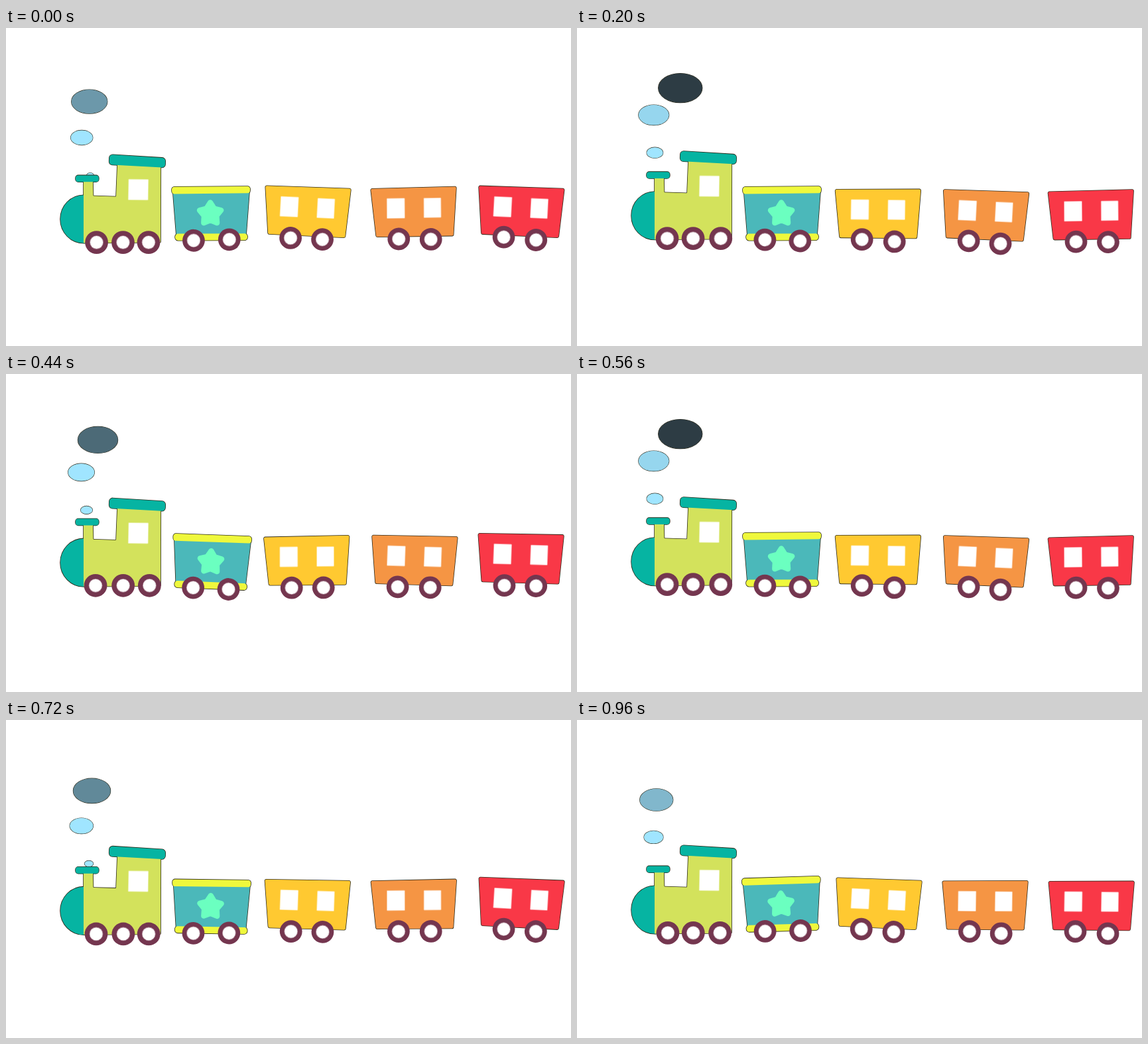
Write an HTML page with a canvas that moves like this. It is 852 by 480 pixels and loops after 1000 ms.

```html
<!DOCTYPE html>
<html lang="en">
<head>
<meta charset="utf-8">
<title>Toy train</title>
<style>
html, body { margin: 0; width: 100%; height: 100%; overflow: hidden; background: #fff; }
canvas { display: block; }
</style>
</head>
<body>
<canvas id="stage" width="852" height="480"></canvas>
<script>
const ctx = document.getElementById('stage').getContext('2d');
const CYCLE = 10;     // drawing steps per bounce
const PUFF_LIFE = 26; // steps a smoke puff stays visible
const TEAL = '#06b4a2', LIME = '#d3e25c', LEMON = '#eff83c', PLUM = '#74364f', INK = '#2c2a1a';

// Plain cars share one shape; each sways about a point near one end
const CARS = [
  { x: 389.6, fill: '#ffc931', pivot: 153 },
  { x: 551.2, fill: '#f59544', pivot: -16 },
  { x: 711.4, fill: '#f93847', pivot: 150 }
];

const wave = (n, peak, amp) => amp * Math.cos((n - peak) * 2 * Math.PI / CYCLE);
const mix = (a, b, f) => a + (b - a) * f;

// Polygon with rounded corners
function shape(points, r) {
  const path = new Path2D();
  const [ax, ay] = points[0], [bx, by] = points[points.length - 1];
  path.moveTo((ax + bx) / 2, (ay + by) / 2);
  points.forEach(([x, y], i) => path.arcTo(x, y, ...points[(i + 1) % points.length], r));
  path.closePath();
  return path;
}

function oval(x, y, rx, ry = rx) {
  const path = new Path2D();
  path.ellipse(x, y, rx, ry, 0, 0, 2 * Math.PI);
  return path;
}

function stroke(path, color, width) {
  ctx.strokeStyle = color;
  ctx.lineWidth = width;
  ctx.lineJoin = 'round';
  ctx.stroke(path);
}

function fill(path, color) {
  ctx.fillStyle = color;
  ctx.fill(path);
}

// Inks only the joint silhouette of several [path, color] parts
function group(...parts) {
  parts.forEach(([path]) => stroke(path, INK, 1.6));
  parts.forEach(([path, color]) => fill(path, color));
}

// White area with a slightly soft edge
function glow(path) {
  fill(path, '#fff');
  stroke(path, 'rgba(255,255,255,.45)', 1.8);
}

function pane(x, y, w, h) {
  glow(shape([[x + 1.3, y + .7], [x + w - .7, y + 1], [x + w - 1.2, y + h - .7], [x + .7, y + h - 1]], .5));
}

function wheel(x, y, r) {
  fill(oval(x, y, r), PLUM);
  glow(oval(x, y, 9.5));
}

// Draws a part rotated about a pivot by a swaying angle in degrees
function sway(n, x, y, peak, part) {
  ctx.save();
  ctx.translate(x, y);
  ctx.rotate((.37 + wave(n, peak, 1.9)) * Math.PI / 180);
  ctx.translate(-x, -y);
  part();
  ctx.restore();
}

// The first wheel runs a little ahead of its car, the second a little behind
function swayCar(n, pivotX, pivotY, peak, body, wheels) {
  sway(n, pivotX, pivotY, peak, body);
  wheels.forEach(([x, y], i) =>
    sway(n + .5 - i, pivotX, pivotY, peak, () => wheel(x, y, 16.9)));
}

function puff(age) {
  const turn = age - 13;
  const x = 113.5 + (turn < 0 ? .08 : .25) * turn ** 2;
  const y = 222.5 - 5.7 * age + .163 * Math.max(0, age - 16) ** 2;
  const w = 11 + 2.28 * age - .006 * age ** 2;
  const dusk = Math.max(0, (age - 15) / 11);
  const path = oval(x, y, w / 2, w / 3);
  stroke(path, INK, 1.2);
  fill(path, `rgb(${mix(160, 45, dusk)},${mix(229, 60, dusk)},${mix(255, 68, dusk)})`);
}

function engine(n) {
  ctx.save();
  ctx.translate(0, wave(n, 0, 2.9) - 2.9);
  group(
    [oval(117.5, 288.5, 35.5, 36.3), TEAL],
    [shape([[117, 229], [131, 229], [131.5, 253.5], [166, 254.5], [168, 206],
      [233.3, 208], [233, 323.7], [117, 324.5]], 1), LIME],
    [shape([[105, 222.4], [139.8, 222.4], [139.8, 232.2], [105, 232.2]], 4), TEAL],
    [shape([[156, 190.9], [240.3, 196.2], [240, 210.8], [155.5, 206.3]], 5), TEAL]
  );
  pane(184, 228, 31, 32);
  ctx.restore();
  for (let i = 0; i < 3; i++) {
    wheel(136 + 40 * i + wave(n, 8.5 + 3.2 * i, 1), 320.3 + wave(n, 0, 3.3), 17.4);
  }
}

function starCar() {
  group(
    [shape([[251.7, 245], [367.4, 245], [361.8, 315], [257, 315]], 1), '#4bb8ba'],
    [shape([[250, 239.9], [368.5, 239.5], [368, 249.8], [250.5, 250.6]], 4), LEMON],
    [shape([[255, 310.7], [364, 310.7], [364, 320.8], [255, 320.8]], 4.5), LEMON]
  );
  const star = shape(Array.from({ length: 10 }, (_, i) => {
    const r = i % 2 ? 11 : 19, a = i * Math.PI / 5 - Math.PI / 2;
    return [308.2 + r * Math.cos(a), 280.7 + r * Math.sin(a)];
  }), 1);
  fill(star, '#6bffc0');
  stroke(star, '#6bffc0', 6);
}

function plainCar(x, y, color) {
  group([shape([[x, y], [x + 129, y], [x + 122.6, y + 74], [x + 6.4, y + 72.5]], 2), color]);
  pane(x + 23, y + 14.8, 28, 31);
  pane(x + 78.7, y + 15.7, 27, 30.5);
}

function draw(n) {
  ctx.fillStyle = '#fff';
  ctx.fillRect(0, 0, 852, 480);
  for (let age = n; age <= PUFF_LIFE; age += CYCLE) puff(age);
  engine(n);
  swayCar(n, 225, 297, 3, starCar, [[283.1, 320.4], [336.5, 320.8]]);
  CARS.forEach((car, i) => {
    const y = 243.3;
    swayCar(n, car.x + car.pivot, 288, 9 - 4 * i, () => plainCar(car.x, y, car.fill),
      [[car.x + 40.3, y + 76.6], [car.x + 88.7, y + 78.3]]);
  });
}

// 30 drawings per second, shown on a 25 per second clock
function tick() {
  const shown = Math.floor((performance.now() % 1000) / 40);
  draw(Math.floor(shown * 1.2 + 1e-6) % CYCLE);
  requestAnimationFrame(tick);
}
tick();
</script>
</body>
</html>
```
